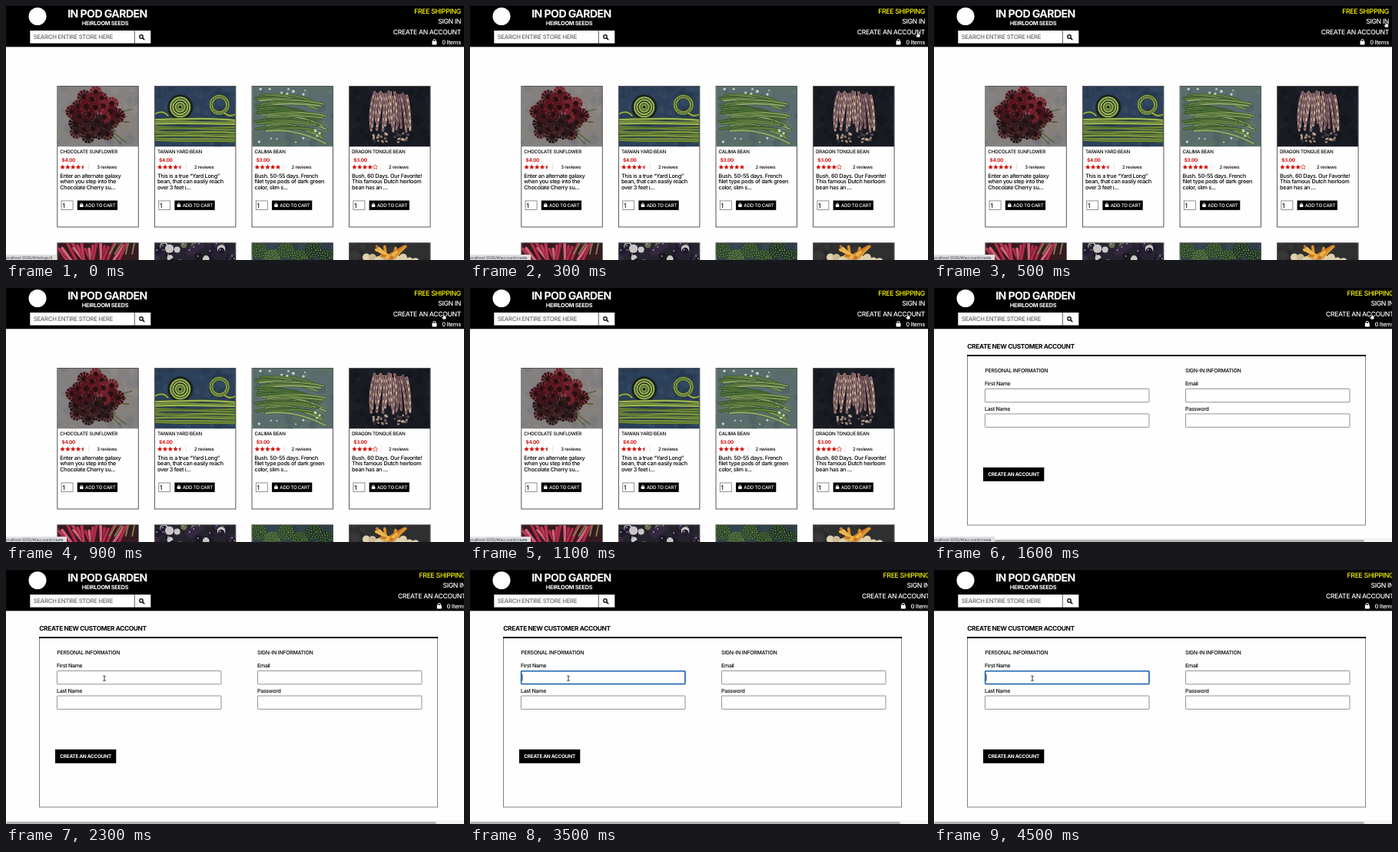
An HTML page that plays this animation: 596 px wide and 331 px high, repeating every 5 s.

```html
<!DOCTYPE html>
<html lang="en">
<head>
<meta charset="utf-8">
<title>Seed store</title>
<style>
  html, body { margin: 0; height: 100%; overflow: hidden; background: #fff; }
  svg { display: block; font-family: Inter, "Open Sans", sans-serif; text-rendering: geometricPrecision; }
  text { letter-spacing: -.04em; }
  #stage { width: 596px; height: 331px; }
</style>
</head>
<body>
<svg id="stage" viewBox="0 0 596 331"></svg>
<script>
const LOOP = 5000;

// Markup helpers
const rect = (x, y, w, h, fill, extra = '') =>
  `<rect x="${x}" y="${y}" width="${w}" height="${h}" fill="${fill}" ${extra}/>`;
const box = (x, y, w, h, stroke, sw = 1, extra = '') =>
  rect(x, y, w, h, 'none', `stroke="${stroke}" stroke-width="${sw}" ${extra}`);
const circle = (x, y, r, fill, extra = '') =>
  `<circle cx="${x}" cy="${y}" r="${r}" fill="${fill}" ${extra}/>`;
const line = (d, stroke, sw, extra = '') =>
  `<path d="${d}" fill="none" stroke="${stroke}" stroke-width="${sw}" stroke-linecap="round" ${extra}/>`;
const text = (x, y, size, str, fill = '#000', weight = 500, anchor = 'start') =>
  `<text x="${x}" y="${y}" font-size="${size}" fill="${fill}" font-weight="${weight}" text-anchor="${anchor}">${str}</text>`;
const group = (x, y, body, scale = 1) => `<g transform="translate(${x} ${y}) scale(${scale})">${body}</g>`;
const repeat = (n, fn) => Array.from({ length: n }, (_, i) => fn(i)).join('');

let seed = 7;
const rnd = (a = 0, b = 1) => {
  seed = (seed * 16807) % 2147483647;
  return a + (b - a) * seed / 2147483647;
};
const pick = list => list[Math.floor(rnd(0, list.length))];

const bag = (x, y, scale) => group(x, y,
  rect(-3, -1.2, 6, 4.6, '#fff', 'rx=".7"') + line('M-1.6 -.5V-2a1.6 1.6 0 0 1 3.2 0V-.5', '#fff', 1), scale);

// Simplified photographs, each 105 x 78.5
const backdrop = (base, tones) => rect(0, 0, 106, 79, base) +
  repeat(50, () => circle(rnd(0, 106), rnd(0, 79), rnd(2, 7), pick(tones), 'opacity=".5"'));
const bean = (d, colour, width, edge) => line(d, edge, width + 1) + line(d, colour, width);

function sunflowers() {
  const bloom = (x, y, r, tones) =>
    circle(x, y, r * .68, 'none', `stroke="${pick(tones)}" stroke-width="${r * .8}" stroke-dasharray="2.6 .6"`) +
    circle(x, y, r * .42, '#241113');
  return backdrop('#858080', ['#73747a', '#938d89', '#88847b', '#74777a']) +
    repeat(20, () => line(`M50 42L${rnd(66, 100)} ${rnd(28, 75)}`, pick(['#55653f', '#454f38', '#8a8066']), 1.6)) +
    repeat(26, i => {
      const a = i * 2.4, r = Math.sqrt((26 - i) / 26);
      const x = 47 + 31 * r * Math.cos(a), y = 38 + 32 * r * Math.sin(a);
      return bloom(x, y, rnd(6.5, 9), y > 42 ? ['#32171b', '#432023', '#28181b'] : ['#5c1520', '#75202b', '#471119']);
    });
}

function yardBeans() {
  const tones = ['#819c43', '#9cb653', '#6e8a38'];
  const rings = (x, y, radii) => radii.map(r =>
    circle(x, y, r, 'none', 'stroke="#2c3b22" stroke-width="3"') +
    circle(x, y, r, 'none', `stroke="${pick(tones)}" stroke-width="2"`)).join('');
  return backdrop('#2c405a', ['#385069', '#25344a']) +
    circle(33, 27, 16.5, '#1a211f') + rings(33, 27, [12.5, 9.5, 6, 3]) +
    rings(84, 24, [12, 9.5]) + bean('M90 34Q97 41 105 36', '#94ad4b', 2, '#2c3b22') +
    bean('M0 36Q10 30 17 38', '#94ad4b', 2, '#2c3b22') +
    repeat(10, i => {
      const y = 43.5 + i * 3;
      return bean(`M0 ${y + rnd(-1, 1)}C35 ${y + rnd(-4, 4)} 70 ${y + rnd(-4, 4)} 106 ${y + rnd(-1, 2)}`, pick(tones), 2.2, '#3a4c26');
    });
}

function greenBeans() {
  return backdrop('#596d6e', ['#6a7d7c', '#485c5f', '#5d705f']) +
    repeat(30, i => {
      const x = rnd(4, 24), y = 12 + i * 1.6;
      return bean(`M${x} ${y}Q${x + 38} ${y - 5} ${x + rnd(62, 78)} ${y + rnd(0, 18)}`,
        pick(['#62843f', '#78964f', '#4e7236', '#8ba366']), 2.4, '#30452a');
    }) +
    repeat(16, i => circle(i < 8 ? rnd(10, 70) : rnd(6, 96), i < 8 ? rnd(3, 13) : rnd(57, 74), rnd(1, 2.1), '#c9cfc8'));
}

function tongueBeans() {
  return backdrop('#181b22', ['#20262f', '#12141a']) +
    repeat(17, i => {
      const x = 26 + i * 3.5, low = rnd(44, 59);
      const d = `M${53 + (x - 53) * .75} ${rnd(6, 15)}Q${x + rnd(-3, 3)} 30 ${x + rnd(-4, 4)} ${low}`;
      return bean(d, pick(['#b09287', '#c7ae98', '#8c6b6c']), 2.8, '#32222b') + line(d, '#653e50', 1.3, 'stroke-dasharray="4 5"');
    }) +
    repeat(50, i => circle((i % 2 ? 40 : 68) + rnd(-9, 9), 67 + rnd(-6, 6), 1.5, pick(['#a08a75', '#5b4352', '#c5b197', '#38313b'])));
}

function redPods() {
  return rect(0, 0, 106, 79, '#351a20') +
    repeat(20, i => {
      const x = i * 5 - 4;
      return bean(`M${x} ${rnd(-5, 8)}L${x + (52 - x) * .5 + rnd(-8, 8)} 34`, pick(['#b02a48', '#cf6379', '#861b36', '#c03855']), 3.6, '#421622');
    }) +
    repeat(4, i => line(`M${76 + i * 8} 0l${rnd(-10, 2)} 14`, '#70824f', 2));
}

function eggplants() {
  return rect(0, 0, 106, 79, '#25232d') +
    repeat(38, () => {
      const x = rnd(0, 106), y = rnd(0, 26);
      return circle(x, y, rnd(3.5, 6), pick(['#191523', '#352840', '#c9c8c4', '#66734f', '#211a2e'])) +
        circle(x - 1.5, y - 1.5, .9, '#b8b5c2');
    });
}

function gourds() {
  return backdrop('#34444e', ['#40525a', '#26333b']) +
    repeat(6, i => {
      const x = 8 + i * 18, y = i % 2 ? 19 : 9;
      return circle(x, y, 11, pick(['#2c4828', '#203522', '#3e5a33'])) +
        [9, 6, 3].map(r => circle(x, y, r, 'none', 'stroke="#7c9561" stroke-width="1.3" stroke-dasharray="1.2 2.2"')).join('');
    });
}

function squashBlossoms() {
  return backdrop('#2f2f31', ['#3d3c3b', '#232325']) +
    repeat(9, i => circle(22 + i * 8, rnd(18, 25), 5, pick(['#c9bb95', '#ddd0ac', '#a08f60']))) +
    repeat(18, () => line(`M${rnd(46, 60)} 19L${rnd(34, 74)} ${rnd(3, 20)}`, pick(['#dc9430', '#ecb64d', '#c97725']), 3.6));
}

const clip = (x, y, pic) => `<svg x="${x}" y="${y}" width="105" height="78.5" viewBox="0 0 105 78.5">${pic()}</svg>`;

// Product cards
const RED = '#d31310';
const starPath = repeat(10, i => {
  const a = i * Math.PI / 5, r = i % 2 ? 1.6 : 3.4;
  return `${i ? 'L' : 'M'}${(r * Math.sin(a)).toFixed(2)} ${(-r * Math.cos(a)).toFixed(2)}`;
}) + 'Z';
const halfStar = 'M0 -3.4L-.9 -1.2L-3.2 -1L-1.4 .5L-2 2.8L0 1.5Z';
const stars = score => repeat(5, i => {
  const left = score - i;
  const d = left === .5 ? halfStar : starPath;
  const paint = left > 0 ? `fill="${RED}"` : `fill="none" stroke="${RED}" stroke-width=".6"`;
  return group(6.8 + i * 6.8, 105.5, `<path d="${d}" ${paint}/>`);
});

const products = [
  [sunflowers, 'CHOCOLATE SUNFLOWER', 4, 4.5, 3, 'Enter an alternate galaxy|when you step into the|Chocolate Cherry su...'],
  [yardBeans, 'TAIWAN YARD BEAN', 4, 4.5, 2, 'This is a true “Yard Long”|bean, that can easily reach|over 3 feet i...'],
  [greenBeans, 'CALIMA BEAN', 3, 5, 2, 'Bush. 50-55 days. French|filet type pods of dark green|color, slim s...'],
  [tongueBeans, 'DRAGON TONGUE BEAN', 3, 4, 2, 'Bush. 60 Days. Our Favorite!|This famous Dutch heirloom|bean has an ...'],
];
const nextRow = [redPods, eggplants, gourds, squashBlossoms];
const cardX = i => 66.8 + i * 126.6;

const card = ([pic, name, price, score, reviews, about], i) => group(cardX(i), 104.5,
  clip(.3, .3, pic) +
  box(0, 0, 105.5, 183.5, '#444', .9) +
  text(3.5, 87.9, 6.25, name) +
  text(5.7, 98.8, 6.4, `$${price}.00`, RED, 700) +
  stars(score) +
  line('M40.8 101v8', '#ccc', .5) +
  text(51.5, 107.7, 6.1, `${reviews} reviews`) +
  about.split('|').map((s, k) => text(3.5, 119 + k * 7.6, 7.3, s)).join('') +
  box(5.3, 149.4, 15, 11.6, '#777', .8) + text(6.6, 158, 8, '1') +
  rect(26, 149, 52.3, 12.4, '#000') + bag(31.5, 155, .75) + text(36.3, 157.5, 6.2, 'ADD TO CART', '#fff'));

const shop = products.map(card).join('') +
  nextRow.map((pic, i) => clip(cardX(i) + .3, 309, pic) + box(cardX(i), 308.7, 105.5, 60, '#444', .9)).join('');

// Header
const header = rect(0, 0, 596, 53.3, '#000') +
  circle(41, 13.5, 11.5, '#fff') +
  text(132, 15.4, 14.1, 'IN POD GARDEN', '#fff', 700, 'middle') +
  text(129, 24.6, 7.35, 'HEIRLOOM SEEDS', '#fff', 700, 'middle') +
  rect(31.3, 32, 157, 16.6, '#fff') +
  line('M167.3 32v16.6', '#333', .8) +
  text(35.8, 43.4, 7.75, 'SEARCH ENTIRE STORE HERE', '#666') +
  circle(176, 39.9, 2.2, 'none', 'stroke="#000" stroke-width="1.3"') + line('M177.8 41.7l2 2', '#000', 1.5);
const menu = text(592, 9.6, 8.8, 'FREE SHIPPING', '#ff0', 500, 'end') +
  text(592, 23.1, 8.7, 'SIGN IN', '#fff', 500, 'end') +
  text(592, 36.8, 8.65, 'CREATE AN ACCOUNT', '#fff', 500, 'end') +
  text(592, 49.6, 7.6, '0 Items', '#fff', 500, 'end') + bag(557.5, 47, 1);

// Account form
const field = (x, y, label) =>
  text(x, y, 7, label) + box(x + .4, y + 4.4, 213.6, 17.4, '#777', .8, 'rx=".8"');
const form = text(43.3, 79.3, 8.3, 'CREATE NEW CUSTOMER ACCOUNT', '#000', 700) +
  box(43.5, 88, 518, 221, '#777', .9) + rect(43, 87, 519, 2, '#000') +
  text(66.3, 109.6, 6.95, 'PERSONAL INFORMATION') + text(327, 109.6, 6.95, 'SIGN-IN INFORMATION') +
  field(66, 127, 'First Name') + field(66, 159.6, 'Last Name') +
  field(327, 127, 'Email') + field(327, 159.6, 'Password') +
  rect(64, 233.8, 79.3, 18, '#000') + text(103.6, 245.1, 6.45, 'CREATE AN ACCOUNT', '#fff', 700, 'middle') +
  rect(0, 326.5, 596, 4.5, '#f3f3f3') + rect(0, 328, 560, 3, '#b4b4b4', 'rx="1.5"');

const hand = '<path d="M-1.2 -3.5q.9 -.8 1.4 .3v2l2.6 .8q.6 2.6 -.7 4.4h-3.2l-2.2 -3 .7 -.6 1.2 .8z" fill="#fff" stroke="#222" stroke-width=".8"/>';
const beam = line('M-1.3 -3.3Q0 -3.3 0 -2.4V2.4Q0 3.3 -1.3 3.3M1.3 -3.3Q0 -3.3 0 -2.4M0 2.4Q0 3.3 1.3 3.3', '#111', .8);

const stage = document.getElementById('stage');
stage.innerHTML = rect(0, 0, 596, 331, '#fefefe') +
  `<g id="shop">${shop}</g><g id="form">${form}</g>${header}<g id="menu">${menu}</g>` +
  `<g id="focus">${box(66.7, 131.7, 213.2, 16.8, '#1c66b8', 1.6, 'rx="1"')}</g>` +
  `<g id="caret">${rect(67.6, 135.8, .8, 8.6, '#000')}</g>` +
  `<g id="status">${rect(0, 324, 1, 7, '#dedfe1', 'id="statusBox"')}<text id="url" x="-1.5" y="329.8" font-size="5.3" fill="#444"></text></g>` +
  `<g id="pointer"><g id="hand">${hand}</g><g id="beam">${beam}</g></g>`;
const el = id => document.getElementById(id);
const show = (id, on) => el(id).setAttribute('display', on ? 'inline' : 'none');

// Pointer stops: time, x, y
const path = [[100, 545, 62], [300, 583, 37], [500, 588.5, 24], [600, 588.5, 24], [900, 570, 37], [1700, 570, 37], [2200, 128, 141.2]];
function pointerAt(t) {
  const i = path.findIndex(p => p[0] > t);
  if (i < 0) return path[path.length - 1].slice(1);
  if (i === 0) return path[0].slice(1);
  const [a, b] = [path[i - 1], path[i]];
  const u = (t - a[0]) / (b[0] - a[0]), e = u * u * (3 - 2 * u);
  return [a[1] + (b[1] - a[1]) * e, a[2] + (b[2] - a[2]) * e];
}

function draw(now) {
  const t = Math.floor(now % LOOP / 100) * 100;
  const onForm = t >= 1600, focused = t >= 2500, listing = t < 300;
  show('shop', !onForm);
  show('form', onForm);
  show('focus', focused);
  show('caret', focused && (t - 2500) % 1000 < 500);
  show('status', t < 2000);
  show('pointer', t >= 100);
  show('hand', t < 1800);
  show('beam', t >= 1800);
  el('menu').setAttribute('transform', `translate(${onForm ? 6.3 : 0} 0)`);
  el('url').textContent = 'localhost:3000/#/' + (listing ? 'listings/4' : 'account/create');
  el('statusBox').setAttribute('width', listing ? 65 : 79);
  el('pointer').setAttribute('transform', `translate(${pointerAt(t)})`);
  requestAnimationFrame(draw);
}
requestAnimationFrame(draw);
</script>
</body>
</html>
```
